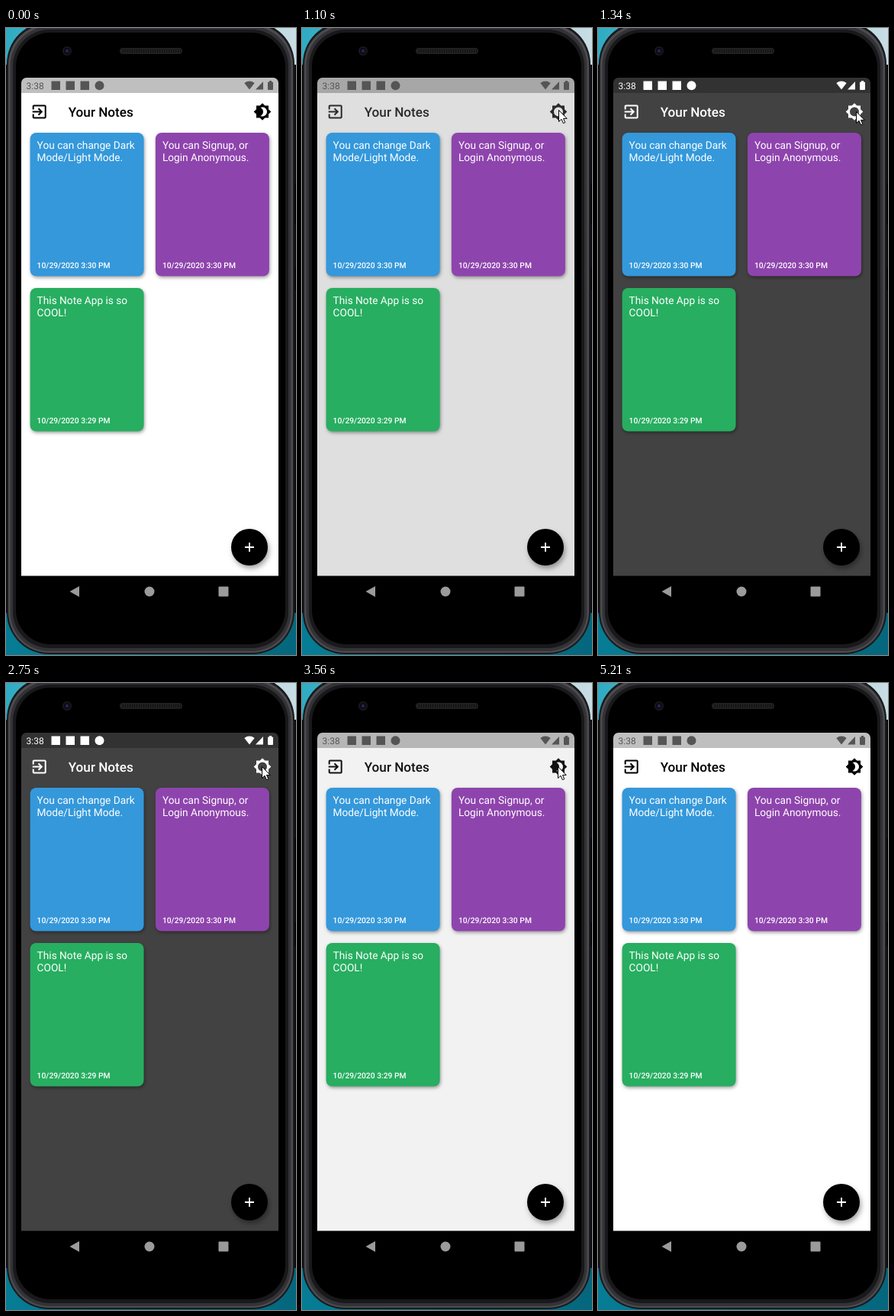
These frames come from a looping animation (380 px wide and 820 px high, 5.32 s). An HTML page with a canvas:

```html
<!DOCTYPE html>
<html lang="en">
<head>
<meta charset="utf-8">
<title>Notes theme switch</title>
<style>
html, body { margin: 0; width: 100%; height: 100%; overflow: hidden; background: #000; }
canvas { display: block; }
</style>
</head>
<body>
<canvas id="stage" width="380" height="820"></canvas>
<script>
const ctx = document.getElementById('stage').getContext('2d');
const LOOP = 5320;
const FONT = 'Roboto, sans-serif';
ctx.textRendering = 'geometricPrecision';

const SUN = 'M20 8.69V4h-4.69L12 .69 8.69 4H4v4.69L.69 12 4 15.31V20h4.69L12 23.31 15.31 20H20v-4.69L23.31 12z';
const icons = {
  moon: new Path2D(SUN + 'M12 18c-.89 0-1.74-.2-2.5-.55C11.56 16.5 13 14.42 13 12s-1.44-4.5-3.5-5.45C10.26 6.2 11.11 6 12 6c3.31 0 6 2.69 6 6s-2.69 6-6 6z'),
  sun: new Path2D(SUN + 'M12 18a6 6 0 1 1 0-12 6 6 0 0 1 0 12z'),
  exit: new Path2D('M10.09 15.59L11.5 17l5-5-5-5-1.41 1.41L12.67 11H3v2h9.67l-2.58 2.59zM19 3H5c-1.11 0-2 .9-2 2v4h2V5h14v14H5v-4H3v4c0 1.1.89 2 2 2h14c1.1 0 2-.9 2-2V5c0-1.1-.9-2-2-2z')
};
const arrow = new Path2D('M.5 .5V15.5L4 12.2L6.4 17.6L8.8 16.6L6.5 11.4H11.2Z');

// Stepped states: start time, value
const themeSteps = [[0, 0], [1100, 0.17], [1220, 0.77], [1340, 1], [3440, 0.67], [3560, 0.07], [3680, 0]];
const cursorSteps = [
  [0, null], [380, [358, 74]], [500, [350, 85]], [620, [342, 98]], [740, [337, 108]], [860, [336, 107]],
  [1340, [338, 109]], [1460, [367, 112]], [1590, [358, 112]],
  [2300, [354, 112]], [2420, [348, 112]], [2540, [342, 111]], [2660, [337, 110]], [2750, [335, 109]],
  [4510, null], [4970, [357, 777]], [5090, [368, 802]], [5210, null]
];
const cards = [
  [31.6, 137, '#3498db', ['You can change Dark', 'Mode/Light Mode.'], '10/29/2020 3:30 PM'],
  [195.9, 137, '#8e44ad', ['You can Signup, or', 'Login Anonymous.'], '10/29/2020 3:30 PM'],
  [31.6, 340, '#27ae60', ['This Note App is so', 'COOL!'], '10/29/2020 3:29 PM']
];

const at = (steps, t) => steps.findLast(([start]) => start <= t)[1];
const gray = v => `rgb(${Math.round(v)},${Math.round(v)},${Math.round(v)})`;

function box(x, y, w, h, r, color) {
  ctx.fillStyle = color;
  ctx.beginPath();
  ctx.roundRect(x, y, w, h, r);
  ctx.fill();
}

function disc(x, y, r, color) {
  ctx.fillStyle = color;
  ctx.beginPath();
  ctx.arc(x, y, r, 0, Math.PI * 2);
  ctx.fill();
}

function poly(points, color) {
  ctx.fillStyle = color;
  ctx.beginPath();
  points.forEach(([x, y]) => ctx.lineTo(x, y));
  ctx.fill();
}

function text(str, x, y, size, weight, color) {
  ctx.font = `${weight} ${size}px ${FONT}`;
  ctx.fillStyle = color;
  ctx.fillText(str, x, y);
}

function icon(path, cx, cy, color) {
  ctx.save();
  ctx.translate(cx - 12, cy - 12);
  ctx.fillStyle = color;
  ctx.fill(path, 'evenodd');
  ctx.restore();
}

function shadowed(blur, dx, dy, alpha, draw) {
  ctx.save();
  ctx.shadowColor = `rgba(0,0,0,${alpha})`;
  ctx.shadowBlur = blur;
  ctx.shadowOffsetX = dx;
  ctx.shadowOffsetY = dy;
  draw();
  ctx.restore();
}

function across(y0, y1, left, right) {
  const fade = ctx.createLinearGradient(0, 0, 380, 0);
  fade.addColorStop(0, left);
  fade.addColorStop(1, right);
  box(0, y0, 380, y1 - y0, 0, fade);
}

function drawPhone() {
  box(0, 0, 380, 820, 0, '#0c0c0e');
  across(0, 48, '#2fabc2', '#c9dde4');
  across(765, 820, '#067c95', '#05677d');

  box(377, 203, 3, 54, 1, '#050505');
  box(377, 313, 3, 30, 1, '#050505');
  box(1, -8, 377, 827, 55, '#19191b');
  box(3, -5, 373, 822, 53, '#4c4c50');
  box(5.5, -2, 368, 817, 51, '#333337');
  box(9, 2, 361, 809, 48, '#19191b');
  box(13, 6, 353, 800, 45, '#000');

  disc(80, 30, 6, '#1b1b20');
  disc(80, 30, 4.5, '#0b0b16');
  disc(80, 30, 2.2, '#25254b');
  box(149, 26, 82, 8, 4, '#202020');
  for (let x = 153; x < 229; x += 3) box(x, 28, 1, 4, 0, '#111');

  poly([[83.5, 737], [96, 730], [96, 744]], '#9b9b9b');
  disc(188, 737, 6.5, '#9b9b9b');
  box(278.5, 730.5, 13, 13, 1, '#9b9b9b');
}

function drawStatus(dark) {
  const color = dark > 0.5 ? '#fff' : '#555';
  box(20, 65, 337, 20, 0, 'rgba(0,0,0,0.25)');
  text('3:38', 26.5, 80, 12, 400, color);
  box(59.5, 69.5, 11.5, 11.5, 0, color);
  box(78.5, 69.5, 11.5, 11.5, 0, color);
  box(97.5, 69.5, 11.5, 11.5, 0, color);
  disc(122.5, 75.2, 6, color);

  ctx.fillStyle = color;
  ctx.beginPath();
  ctx.moveTo(319, 80.5);
  ctx.lineTo(312.3, 72);
  ctx.quadraticCurveTo(319, 67.2, 325.7, 72);
  ctx.fill();
  poly([[327, 80.5], [337, 70], [337, 80.5]], color);
  box(343, 70.5, 7, 10.5, 1, color);
  box(345, 69, 3, 2, 0, color);
}

function drawCard([x, y, color, lines, date]) {
  shadowed(4, 1, 2, 0.38, () => box(x, y, 149, 187.5, 8, color));
  lines.forEach((line, i) => text(line, x + 9, y + 21 + 16 * i, 13.7, 400, '#fff'));
  text(date, x + 9, y + 176.5, 10.3, 500, '#fff');
}

function drawApp(t) {
  const dark = at(themeSteps, t);
  const ink = gray(255 * dark);
  ctx.save();
  ctx.beginPath();
  ctx.roundRect(20, 65, 337, 651.4, [7, 7, 0, 0]);
  ctx.clip();
  box(20, 65, 337, 652, 0, gray(255 - 189 * dark));
  drawStatus(dark);

  if (t >= 3440 && t < 3560) {
    ctx.save();
    ctx.beginPath();
    ctx.rect(20, 85, 337, 48);
    ctx.clip();
    disc(336, 110, 30, 'rgba(255,255,255,0.09)');
    ctx.restore();
  }

  icon(icons.exit, 43.7, 109.5, ink);
  text('Your Notes', 81.7, 116, 17.15, 500, ink);
  icon(t >= 1100 && t < 3440 ? icons.sun : icons.moon, 336, 109.5, ink);
  cards.forEach(drawCard);

  shadowed(6, 2, 4, 0.35, () => disc(319, 679, 24, '#000'));
  box(313, 678.1, 12, 1.8, 0, '#fff');
  box(318.1, 673, 1.8, 12, 0, '#fff');
  ctx.restore();
}

function drawCursor(t) {
  const pos = at(cursorSteps, t);
  if (!pos) return;
  ctx.save();
  ctx.translate(...pos);
  ctx.fillStyle = '#fff';
  ctx.fill(arrow);
  ctx.strokeStyle = '#000';
  ctx.lineWidth = 1;
  ctx.stroke(arrow);
  ctx.restore();
}

function render(now) {
  const t = now % LOOP;
  drawPhone();
  drawApp(t);
  drawCursor(t);
  requestAnimationFrame(render);
}
render(0);
</script>
</body>
</html>
```
